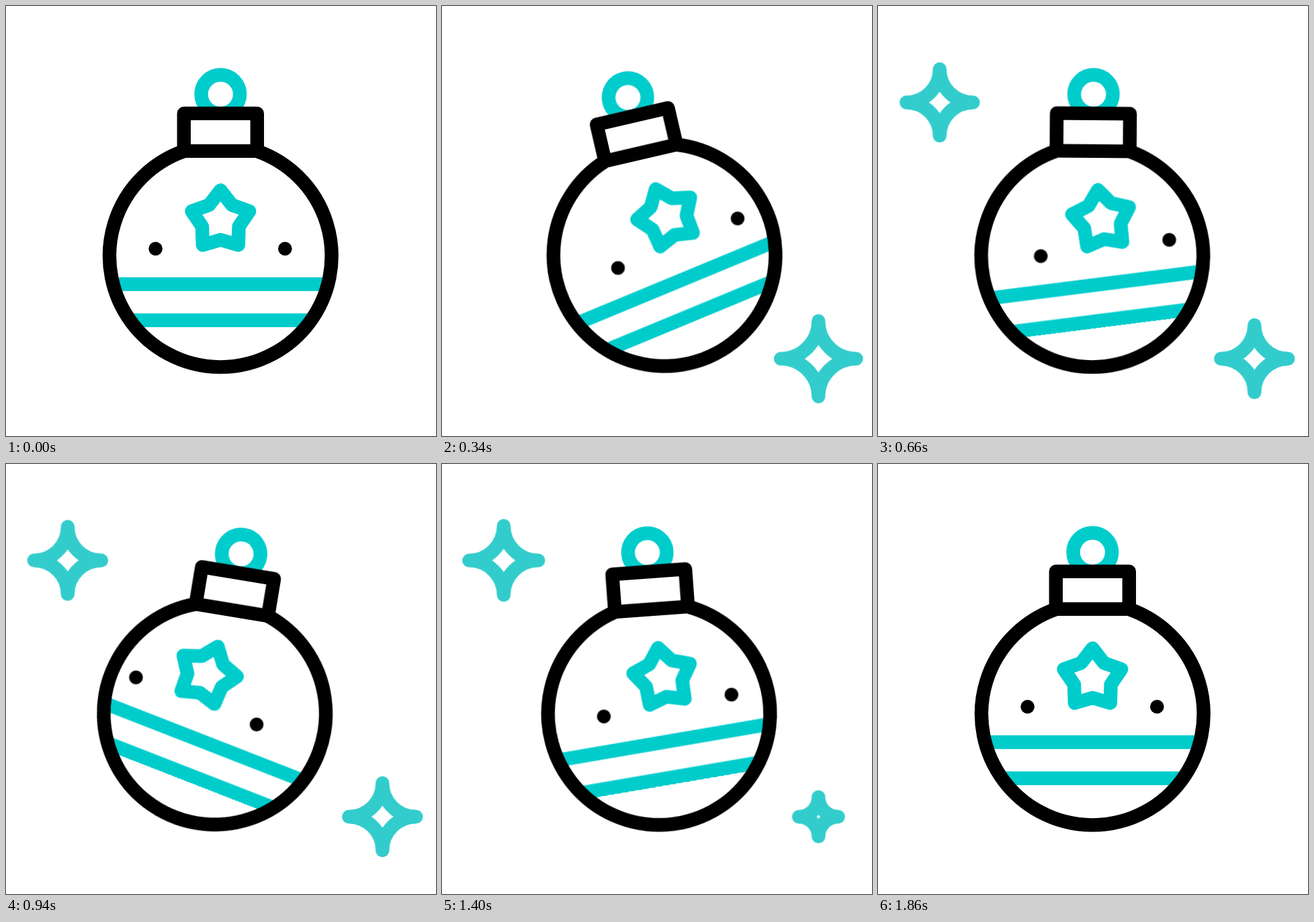
These frames come from a looping animation (640 px wide and 640 px high, 2.4 s). An HTML page without scripts:

```html
<!DOCTYPE html>
<html lang="en">
<head>
<meta charset="utf-8">
<title>Bauble</title>
<style>
  html, body { margin: 0; height: 100%; overflow: hidden; background: #fff; }
  svg {
    display: block; width: 100vw; height: 100vh;
    fill: none; stroke-width: 20.4; stroke-linejoin: round;
  }
  .teal { stroke: #00cccc; }
  .ink { stroke: #000; }

  /* The decoration swings like the bauble, a little later and from the cap. */
  .bauble, .decor { animation: swing 2400ms cubic-bezier(.333, 0, .667, 1) infinite both; }
  .bauble { transform-origin: 319.3px 319.5px; }
  .decor { transform-origin: 319.3px 217px; animation-delay: 83ms; }

  .spark {
    stroke: #33cccc; vector-effect: non-scaling-stroke;
    animation: twinkle 2400ms cubic-bezier(.333, 0, .667, 1) infinite both;
  }
  .late { animation-delay: 340ms; }

  @keyframes swing {
    0% { transform: rotate(0deg); }
    18.33% { transform: rotate(-15deg); }
    35.13% { transform: rotate(12deg); }
    52.08% { transform: rotate(-6deg); }
    69.17%, 100% { transform: rotate(0deg); }
  }
  @keyframes twinkle {
    0%, 6.25% { transform: scale(0); }
    17.04% { transform: scale(1.354); }
    25.2%, 42.5% { transform: scale(1); }
    52.42% { transform: scale(1.354); }
    63.33%, 100% { transform: scale(0); }
  }
</style>
</head>
<body>
<svg viewBox="0 0 640 640">
  <defs>
    <clipPath id="ball"><circle cx="319.3" cy="372" r="165.3"/></clipPath>
  </defs>

  <g class="bauble">
    <circle class="teal" cx="319.3" cy="131.3" r="28.8"/>
    <g clip-path="url(#ball)">
      <g class="decor">
        <path class="teal" d="M100 414H540M100 467.8H540"/>
        <path class="teal" transform="translate(319.3 319.3)"
          d="M0-45 16.9-23.2 42.8-13.9 27.3 8.9 26.5 36.4 0 28.7-26.5 36.4-27.3 8.9-42.8-13.9-16.9-23.2Z"/>
        <g fill="#000">
          <circle cx="222.6" cy="361.3" r="10.3"/>
          <circle cx="415.3" cy="361.3" r="10.3"/>
        </g>
      </g>
    </g>
    <path class="ink" d="M264.8 216A165.3 165.3 0 1 0 373.8 216"/>
    <rect class="ink" fill="#fff" x="264.8" y="159.9" width="109" height="56"/>
  </g>

  <g transform="translate(560.3 525)">
    <path class="spark" d="M0-50A50 50 0 0 0 50 0 50 50 0 0 0 0 50 50 50 0 0 0-50 0 50 50 0 0 0 0-50Z"/>
  </g>
  <g transform="translate(91.8 143.5)">
    <path class="spark late" d="M0-50A50 50 0 0 0 50 0 50 50 0 0 0 0 50 50 50 0 0 0-50 0 50 50 0 0 0 0-50Z"/>
  </g>
</svg>
</body>
</html>
```
